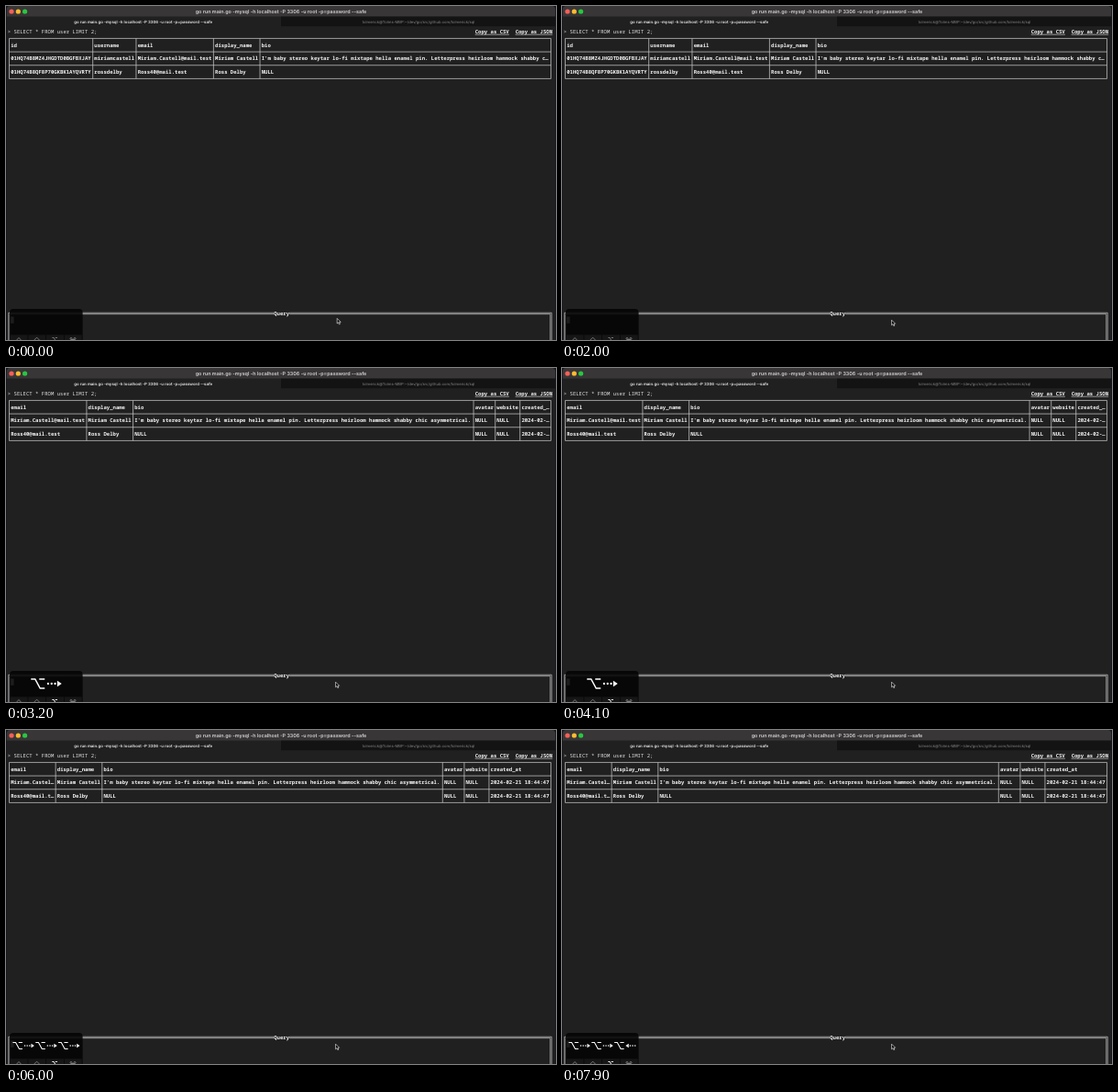
Animation of 600x365 px, one loop 8000 ms. Source, as an HTML page:

```html
<!DOCTYPE html>
<html lang="en">
<head>
<meta charset="utf-8">
<style>
html, body { margin: 0; width: 100%; height: 100%; overflow: hidden; background: #15151d; }
svg { display: block; width: 600px; height: 365px; }
text { text-rendering: geometricPrecision; }
.mono { font: 5.628px "Noto Sans Mono", "DejaVu Sans Mono", monospace; fill: #dedede; }
.bold { font-weight: 700; fill: #f2f2f2; }
.ui { font-family: Inter, Roboto, sans-serif; text-anchor: middle; }
.line { fill: none; stroke: #c4c4c4; stroke-width: .75; }
</style>
</head>
<body>
<svg id="stage" viewBox="0 0 600 365"></svg>
<script>
const LOOP = 8000, CELL = 3.377, ROW = 7.33;
const colX = c => 1.8 + c * CELL;
const midX = c => 3.5 + c * CELL;
const rowY = r => 28.1 + r * ROW;

const BIO = "I'm baby stereo keytar lo-fi mixtape hella enamel pin. " +
  "Letterpress heirloom hammock shabby chic asymmetrical.";
const DATA = {
  id: ["01HQ74B8MZ4JHGDTD0BGFBXJAY", "01HQ74B8QF8P70GKBK1AYQVRTY"],
  username: ["miriamcastell", "rossdelby"],
  email: ["Miriam.Castell@mail.test", "Ross40@mail.test"],
  display_name: ["Miriam Castell", "Ross Delby"],
  bio: [BIO, "NULL"],
  avatar: ["NULL", "NULL"],
  website: ["NULL", "NULL"],
  created_at: ["2024-02-21 18:44:47", "2024-02-21 18:44:47"]
};
// visible columns and their widths in characters, per scroll position
const VIEWS = [
  { id: 26, username: 13, email: 24, display_name: 14, bio: 93 },
  { email: 24, display_name: 14, bio: 109, avatar: 6, website: 7, created_at: 9 },
  { email: 14, display_name: 14, bio: 109, avatar: 6, website: 7, created_at: 19 }
];
const COMMAND = "go run main.go -mysql -h localhost -P 3306 -u root -p=password --safe";

const text = (s, x, y, cls, more = "") => `<text x="${x}" y="${y}" class="${cls}" ${more}>${s}</text>`;
const mono = (s, col, row, cls = "") => text(s, colX(col), rowY(row) + 2, "mono " + cls);
const rect = (x, y, w, h, fill, more = "") =>
  `<rect x="${x}" y="${y}" width="${w}" height="${h}" fill="${fill}" ${more}/>`;
const line = (d, more = "") => `<path class="line" d="${d}" ${more}/>`;
const clip = (s, n) => s.length > n ? s.slice(0, n - 1) + "…" : s;

function chrome() {
  const lights = ["#fe5f57", "#febc2e", "#28c840"]
    .map((c, i) => `<circle cx="${6 + i * 7.3}" cy="6" r="2.6" fill="${c}"/>`).join("");
  return rect(.8, 0, 598.4, 372, "#202020", 'rx="4"') +
    `<path d="M.8 11.6V4a4 4 0 0 1 4-4H595.2a4 4 0 0 1 4 4V11.6z" fill="#383637"/>` + lights +
    text(COMMAND, 300, 8.1, "ui", 'font-size="5.4" font-weight="600" fill="#d6d4d5"') +
    rect(300, 11.6, 299.2, 10.6, "#131313") +
    text(COMMAND, 149.7, 18.5, "ui", 'font-size="4.37" font-weight="600" fill="#ececec"') +
    text("tolmerick@Tolms-MBP:~/dev/go/src/github.com/tolmerick/sql", 450, 18.5, "ui",
      'font-size="4.2" fill="#858585"');
}

function header() {
  const link = (s, col) => mono(s, col, 0, "bold") +
    line(`M${colX(col)} 31.2h${s.length * CELL}`, 'stroke-width=".6"');
  return mono("&gt; SELECT * FROM user LIMIT 2;", 0, 0) +
    link("Copy as CSV", 151) + link("Copy as JSON", 164);
}

function table(view) {
  let col = 0, out = "", d = `M${midX(0)} ${rowY(1)}V${rowY(7)}`;
  for (const [name, width] of Object.entries(view)) {
    [name, ...DATA[name]].forEach((s, i) => out += mono(clip(s, width), col + 1, 2 + 2 * i, "bold"));
    col += width + 1;
    d += `M${midX(col)} ${rowY(1)}V${rowY(7)}`;
  }
  for (const r of [1, 3, 5, 7]) d += `M${midX(0)} ${rowY(r)}H${midX(col)}`;
  return out + line(d);
}

function queryBox() {
  const frame = k => `M${midX(0) + k} 370V${rowY(42) + k}H${midX(175) - k}V370`;
  return line(frame(-.7) + frame(.7)) +
    rect(colX(86), 332, 5 * CELL, 8, "#202020") + mono("Query", 86, 42, "bold") +
    rect(colX(1), 339.5, CELL, 7.3, "#d0d0d0");
}

const OPTION = "M0-5H4.5L10 5H15M9-5H15";

function arrow(left) {
  const dots = [1.2, 5, 8.8].map(x => `<circle cx="${x}" r="1.15"/>`).join("");
  return `<g transform="translate(${left ? 33.5 : 17.5})${left ? " scale(-1 1)" : ""}">` +
    dots + `<path d="M11.2-3.2L16 0L11.2 3.2z"/></g>`;
}

function keys(list) {
  const scale = list.length > 2 ? .7 : 1, step = 35.5 * scale;
  const start = 44 - ((list.length - 1) * step + 33.5 * scale) / 2;
  return list.map((left, i) =>
    `<g transform="translate(${start + i * step} 345) scale(${scale})" fill="#fff">` +
    `<path d="${OPTION}" fill="none" stroke="#fff" stroke-width="1.5"/>${arrow(left)}</g>`).join("");
}

function overlay(pressed, held) {
  const icon = (d, x, on) => `<path d="${d}" transform="translate(${x} 362.2)" fill="none" ` +
    `stroke="${on ? "#fff" : "#8c8c8c"}" stroke-width="${on ? 1 : .8}"/>`;
  let out = rect(4, 331, 79.6, 40, "#040404", 'rx="4" opacity=".88"');
  for (let i = 0; i < 4; i++) out += rect(4.6 + i * 19.7, 359.4, 19, 8, "#161616");
  return out + icon("M-2.5 3L0 .3L2.5 3", 14, false) +
    icon("M-3 3L0 0L3 3", 33.6, false) +
    icon("M-2.8.3H-1L1.5 5M.6.3H2.8", 53.2, held) +
    icon("M-1 3V1.3A1 1 0 1 0-2 2.3H2A1 1 0 1 0 1 1.3V3", 73, false) + keys(pressed);
}

function pointer(t) {
  const k = t < 100 ? 0 : t < 300 ? .5 : 1;
  return `<path transform="translate(${361.2 - 1.6 * k} ${341.4 + 1.8 * k})" ` +
    `d="M0 0V5.6L1.3 4.4L2.2 6.4L3.2 6L2.3 4H4z" fill="#000" stroke="#fff" stroke-width=".6"/>`;
}

function scene(t) {
  const view = VIEWS[t < 3200 ? 0 : t < 4500 ? 1 : 2];
  const pressed = [3100, 4500, 5600].filter(at => t >= at).map((at, i) => i === 2 && t >= 6600);
  return chrome() + header() + table(view) + queryBox() + overlay(pressed, t >= 2100) + pointer(t);
}

const stage = document.getElementById("stage"), begin = performance.now();
let shown = "";
function tick() {
  const next = scene((performance.now() - begin) % LOOP);
  if (next !== shown) stage.innerHTML = shown = next;
  requestAnimationFrame(tick);
}
tick();
</script>
</body>
</html>
```
